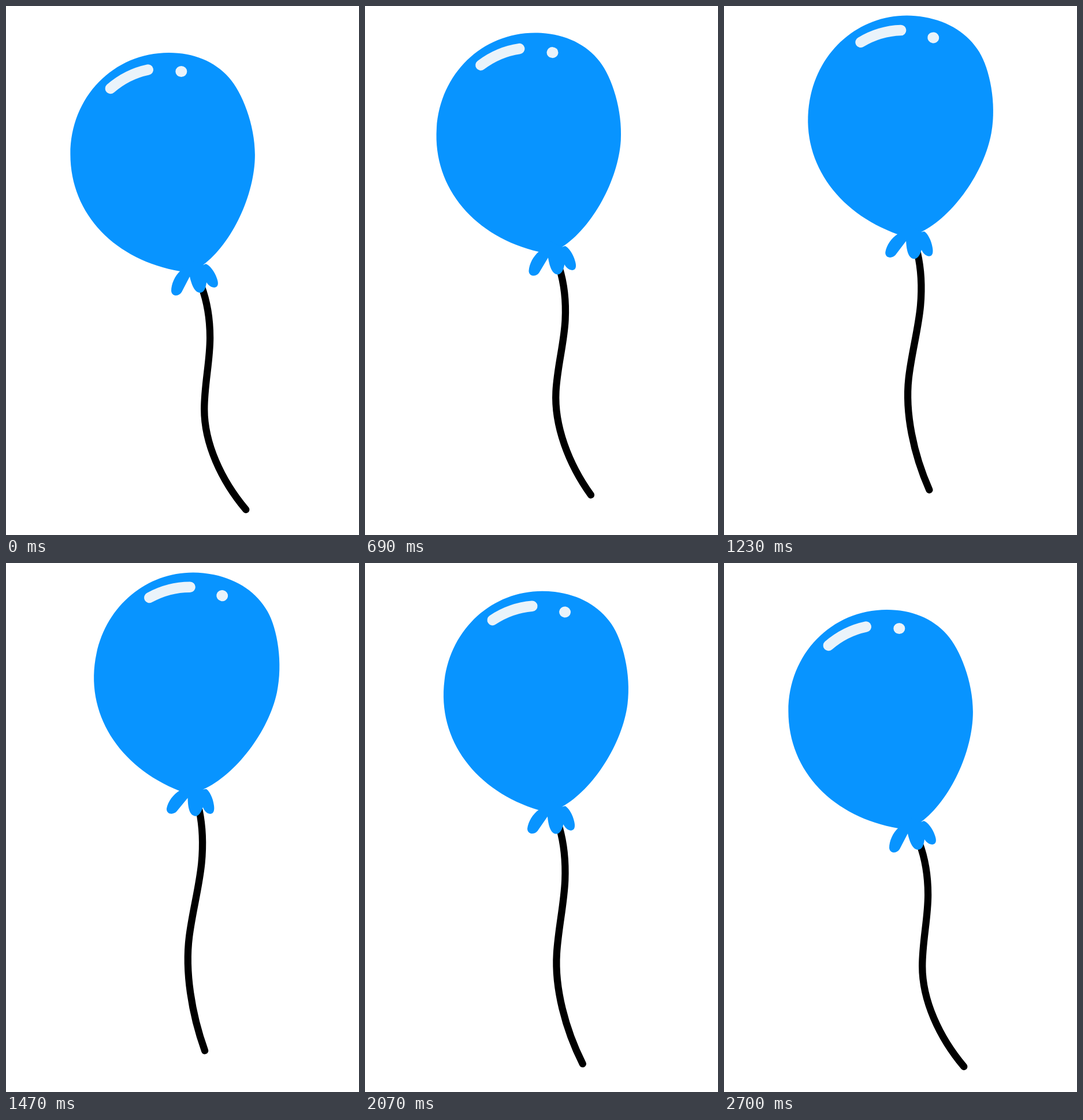
Write an HTML page with a canvas that moves like this. It is 611 px wide and 917 px high and loops after 2.73 s.

```html
<!DOCTYPE html>
<html lang="en">
<head>
<meta charset="utf-8">
<title>Balloon</title>
<style>
  html, body { margin: 0; width: 100%; height: 100%; overflow: hidden; background: #fff; }
  canvas { display: block; }
</style>
</head>
<body>
<canvas id="stage" width="611" height="917"></canvas>
<script>
const ctx = document.getElementById('stage').getContext('2d');

const LOOP = 2730, STEP = 30, HALF = 1350;
const BLUE = '#0894ff', SHINE = '#eaf3fa';
const PIVOT = { x: 322, y: 452 };

const body = new Path2D(`M282 81 C325 81 361 96 386 124 C409 150 431 206 431 258
  C431 327 391 412 341 449 L302 460 C190 441 111.5 362 111.5 257 C111.5 158 186 81 282 81 Z`);
const knot = new Path2D(`M302 459 C292 468 286 482 286 494 C287 504 299 504 304 496
  L318 469 C321 482 326 497 336 497 C343 497 346 488 347 479
  C350 484 355 488 361 488 C368 487 368 480 365 472
  C361 460 352 449 346 447 L341 449 L320 440 Z`);
const gleam = new Path2D('M181 143 Q210 118 246 110.5');

// String control points: x, y, and how far each drifts at full swing
const cord = [
  [338, 485, 4, 0], [348, 512, 6, 0], [353, 543, 9, 0],
  [353, 575, 13, 0], [353, 616, 18, 1], [343, 656, 26, 4],
  [343, 699, 30, 5], [343, 758, 35.5, 6.5], [372, 822, 33, 13],
  [415, 873, 25, 20]
];

// Cubic ease with handles (0.2, 0) and (0.8, 1)
function ease(x) {
  let lo = 0, hi = 1;
  for (let i = 0; i < 24; i++) {
    const u = (lo + hi) / 2, v = 1 - u;
    if (0.6 * u * v * v + 2.4 * u * u * v + u * u * u < x) lo = u; else hi = u;
  }
  return lo * lo * (3 - 2 * lo);
}

// Eases 0 to 1 and back, starting after a delay
function swing(time, delay) {
  const phase = ((time - delay + 2 * HALF) % (2 * HALF)) / HALF;
  return phase < 1 ? ease(phase) : 1 - ease(phase - 1);
}

function stroke(path, color, width) {
  ctx.strokeStyle = color;
  ctx.lineWidth = width;
  ctx.stroke(path);
}

function cordPath(bend) {
  const points = cord.map(([x, y, dx, dy]) => [x + dx * bend, y + dy * bend]);
  const path = new Path2D();
  path.moveTo(...points[0]);
  for (let i = 1; i < points.length; i += 3) {
    path.bezierCurveTo(...points[i], ...points[i + 1], ...points[i + 2]);
  }
  return path;
}

function draw(time) {
  const rise = -63 * swing(time, 0);
  const tilt = -1.05 + 13.2 * swing(time, 180);
  const bend = -0.197 + 1.205 * swing(time, 300);

  ctx.fillStyle = '#fff';
  ctx.fillRect(0, 0, 611, 917);
  ctx.save();
  ctx.translate(PIVOT.x, PIVOT.y + rise);
  ctx.rotate(tilt * Math.PI / 180);
  ctx.translate(-PIVOT.x, -PIVOT.y);
  ctx.lineCap = 'round';

  stroke(cordPath(bend), '#000', 12.3);
  ctx.fillStyle = BLUE;
  ctx.fill(body);
  ctx.fill(knot);
  stroke(gleam, SHINE, 18.5);
  ctx.fillStyle = SHINE;
  ctx.beginPath();
  ctx.ellipse(303.5, 113.5, 10, 9.5, 0, 0, 2 * Math.PI);
  ctx.fill();
  ctx.restore();
}

let start = null;
function tick(now) {
  if (start === null) start = now;
  const time = Math.max(0, now - start) % LOOP;
  draw(Math.floor(time / STEP + 0.01) * STEP);
  requestAnimationFrame(tick);
}
draw(0);
requestAnimationFrame(tick);
</script>
</body>
</html>
```
